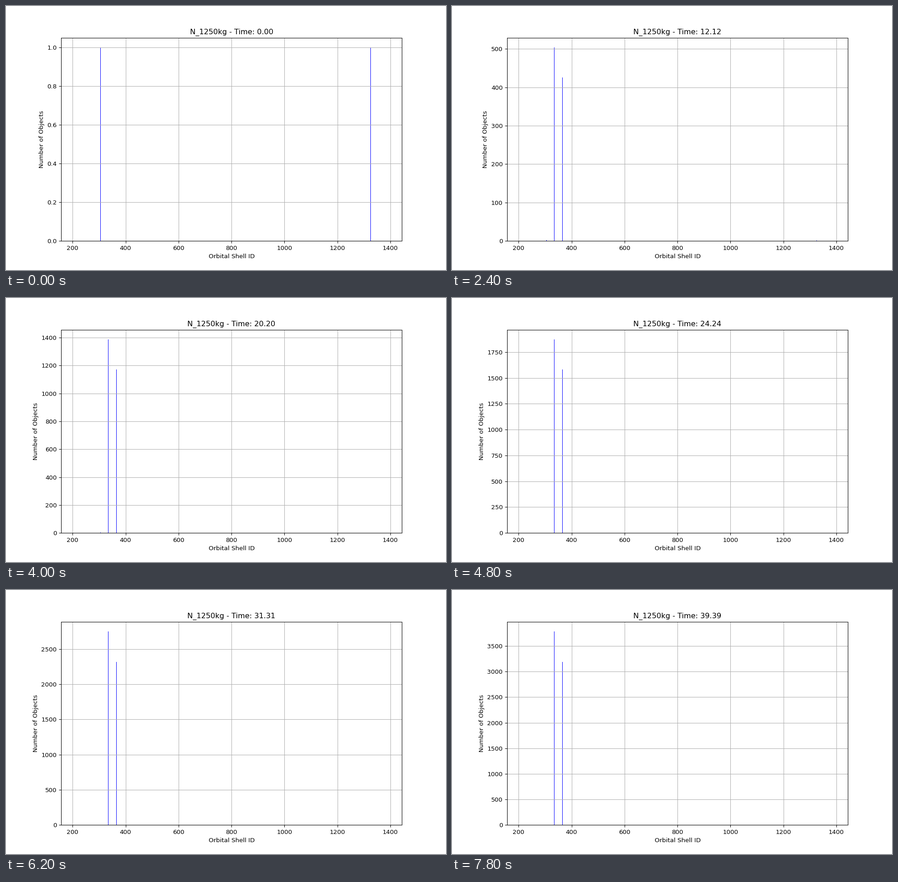
Animation of 966 by 580 pixels, one loop 8 s. Source, as a matplotlib script:

```python
import numpy as np
import matplotlib.pyplot as plt
from matplotlib.animation import FuncAnimation

FRAMES = 40
DPI = 96.6
SHELLS = np.arange(215, 1400, 30)
BAR_WIDTH = 1.7  # about one pixel, so no bar is lost to snapping

# Growth of the fullest shell: step, count, slope per step
STEPS = np.array([8, 16, 20, 24, 31, 39])
COUNTS = np.array([165, 927, 1387, 1873, 2753, 3786])
SLOPES = np.array([69, 111, 118.5, 123.7, 127.6, 130])


def peak(k):
    """Count in shell 335: power-law start, then a Hermite curve."""
    if k <= STEPS[0]:
        return COUNTS[0] * (k / STEPS[0]) ** 3.35
    i = min(np.searchsorted(STEPS, k, side="right") - 1, len(STEPS) - 2)
    h = STEPS[i + 1] - STEPS[i]
    t = (k - STEPS[i]) / h
    s = t * t * (3 - 2 * t)
    return (COUNTS[i] * (1 - s) + COUNTS[i + 1] * s
            + h * t * (1 - t) * (SLOPES[i] * (1 - t) - SLOPES[i + 1] * t))


def objects(k):
    n = np.zeros(len(SHELLS))
    top = peak(k)
    n[SHELLS == 305] = 1 + 1.5 * (1 - np.exp(-k / 8))
    n[SHELLS == 335] = top
    n[SHELLS == 365] = top * (0.845 - 0.00006 * k)
    n[SHELLS == 1325] = 1
    return n


fig, ax = plt.subplots(figsize=(10, 580.005 / DPI), dpi=DPI)


def draw(k):
    ax.clear()
    ax.bar(SHELLS, objects(k), width=BAR_WIDTH, color="blue")
    ax.set_xlim(156.06, 1443.94)
    ax.set_title(f"N_1250kg - Time: {k * 100 / 99:.2f}")
    ax.set_xlabel("Orbital Shell ID")
    ax.set_ylabel("Number of Objects")
    ax.grid(True)
    return []


anim = FuncAnimation(fig, draw, frames=FRAMES, init_func=lambda: draw(0),
                     interval=200, repeat=True, repeat_delay=0)
plt.show()
```
